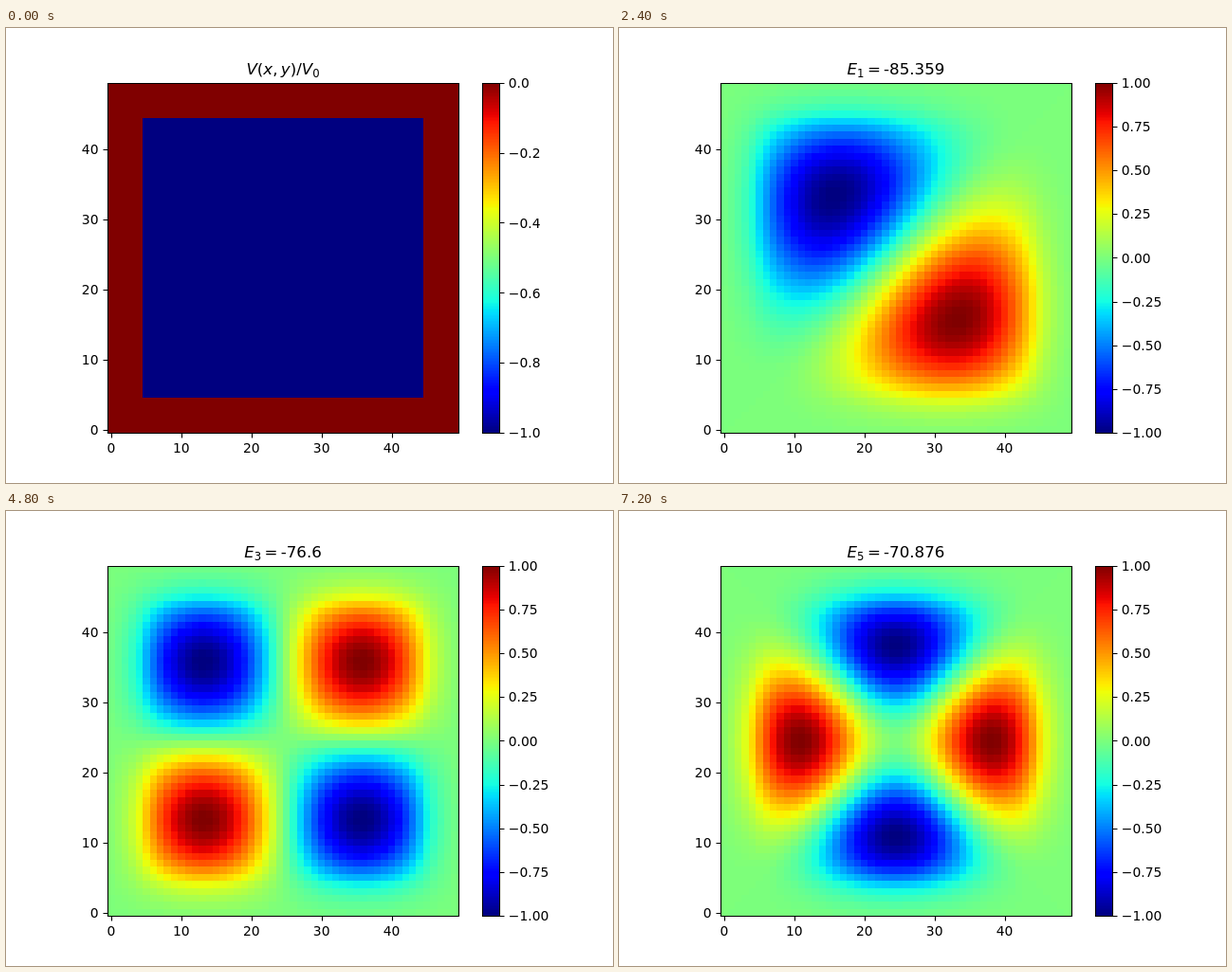
These frames come from a looping animation (640x480 px, 8 s). An HTML page with a canvas:

```html
<!DOCTYPE html>
<html lang="en">
<head>
<meta charset="utf-8">
<title>Square well states</title>
<style>
  html, body { margin: 0; width: 100%; height: 100%; overflow: hidden; background: #fff; }
  canvas, svg { position: absolute; left: 0; top: 0; width: 640px; height: 480px; display: block; }
  text { font-family: "DejaVu Sans", sans-serif; font-size: 13.89px; font-kerning: none; fill: #000; white-space: pre; }
  .title { font-size: 16.67px; }
  .it { font-style: italic; }
  .sub { font-size: 11.67px; }
  path { fill: none; stroke: #000; stroke-width: 1.11; }
</style>
</head>
<body>
<canvas id="heat" width="640" height="480"></canvas>
<svg id="plot" width="640" height="480" viewBox="0 0 640 480">
  <path d="M107.5 58.5H477.5V427.5H107.5ZM502.5 58.5H520.5V427.5H502.5Z"/>
  <g id="axes"></g>
  <g id="bar"></g>
  <text id="title" class="title" y="49"></text>
</svg>
<script>
const N = 50, W = N + 2;              // grid with a zero rim
const LEFT = 107.2, TOP = 57.6, BOTTOM = 427.2, SIZE = 369.6, CELL = SIZE / N;
const DEPTH = 100, KIN = 49 * 49 / 4; // well depth and kinetic factor
const HOLD = 1200, LOOP = 8000;

const $ = id => document.getElementById(id);
const ctx = $("heat").getContext("2d");
const at = (i, j) => (j + 1) * W + i + 1;
const inWell = i => i >= 5 && i < 45;

function grid(fn) {
  const g = new Float64Array(W * W);
  for (let j = 0; j < N; j++)
    for (let i = 0; i < N; i++) g[at(i, j)] = fn(i, j);
  return g;
}

const well = grid((i, j) => inWell(i) && inWell(j) ? -1 : 0);

// Standing wave n of a slightly wider box, used as a first guess
function wave(n, i) {
  const u = (i - 24.5) * Math.PI / 45;
  if (Math.abs(u) > Math.PI / 2) return 0;
  return n % 2 ? Math.cos(n * u) : Math.sin(n * u);
}

function removePart(g, ref) {
  let dot = 0, norm = 0;
  for (let k = 0; k < g.length; k++) { dot += g[k] * ref[k]; norm += ref[k] * ref[k]; }
  for (let k = 0; k < g.length; k++) g[k] -= dot / norm * ref[k];
}

// Relax a guess to the eigenstate of the well with the given energy
function solve(energy, guess, lower) {
  const step = 1 / 2600;
  let a = grid((i, j) => guess(i, j)), b = new Float64Array(W * W);
  for (let n = 0; n < 800; n++) {
    for (let j = 0; j < N; j++)
      for (let i = 0; i < N; i++) {
        const k = at(i, j);
        const lap = a[k - 1] + a[k + 1] + a[k - W] + a[k + W] - 4 * a[k];
        b[k] = a[k] + step * (KIN * lap + (energy - DEPTH * well[k]) * a[k]);
      }
    if (lower) removePart(b, lower);
    [a, b] = [b, a];
  }
  let top = 0;
  for (const v of a) top = Math.max(top, Math.abs(v));
  return a.map(v => v / top);
}

const pair = (m, n, sx, sy) => (i, j) =>
  sx * wave(m, i) * wave(n, j) + sy * wave(n, i) * wave(m, j);

const ground = solve(-94.127, pair(1, 1, 1, 0));
const scenes = [
  { data: well, tick: 0.2 },
  { data: ground, energy: "-94.127", tick: 0.2 },
  { data: solve(-85.359, pair(2, 1, 1, -1)), energy: "-85.359", tick: 0.25 },
  { data: solve(-85.359, pair(2, 1, -1, -1)), energy: "-85.359", tick: 0.25 },
  { data: solve(-76.6, pair(2, 2, 1, 0)), energy: "-76.6", tick: 0.25 },
  { data: solve(-70.895, pair(1, 3, 1, 1), ground), energy: "-70.895", tick: 0.2 },
  { data: solve(-70.876, pair(1, 3, 1, -1)), energy: "-70.876", tick: 0.25 }
];

function ramp(x, stops) {
  for (let s = 1; s < stops.length; s++) {
    const [x0, y0] = stops[s - 1], [x1, y1] = stops[s];
    if (x <= x1) return Math.round(255 * (y0 + (y1 - y0) * (x - x0) / (x1 - x0)));
  }
  return 0;
}

const RED = [[0, 0], [.35, 0], [.66, 1], [.89, 1], [1, .5]];
const GREEN = [[0, 0], [.125, 0], [.375, 1], [.64, 1], [.91, 0], [1, 0]];
const BLUE = [[0, .5], [.11, 1], [.34, 1], [.65, 0], [1, 0]];
const jet = Array.from({ length: 256 }, (_, i) =>
  `rgb(${[RED, GREEN, BLUE].map(c => ramp(i / 255, c)).join()})`);
const colour = t => jet[Math.max(0, Math.min(255, Math.floor(t * 256)))];

const label = (x, y, s, anchor) => `<text x="${x}" y="${y}" text-anchor="${anchor}">${s}</text>`;
const snap = v => Math.round(v) + 0.5;

function drawAxes() {
  let d = "", out = "";
  for (let v = 0; v < N; v += 10) {
    const off = (v + 0.5) * CELL, x = LEFT + off, y = BOTTOM - off;
    d += `M${snap(x)} 427.5v5M107.5 ${snap(y)}h-5`;
    out += label(x, 448, v, "middle") + label(97.5, Math.round(y + 5.2), v, "end");
  }
  $("axes").innerHTML = `<path d="${d}"/>` + out;
}

function drawBar(lo, hi, tick) {
  let d = "", out = "";
  const digits = tick === 0.2 ? 1 : 2;
  for (let n = Math.ceil(lo / tick - 1e-6); n * tick <= hi + 1e-6; n++) {
    const v = n * tick, y = BOTTOM - SIZE * (v - lo) / (hi - lo);
    d += `M520.5 ${snap(y)}h5`;
    out += label(529.8, Math.round(y + 5.2), (n < 0 ? "\u2212" : "") + Math.abs(v).toFixed(digits), "start");
  }
  $("bar").innerHTML = `<path d="${d}"/>` + out;
}

function drawTitle(energy, n) {
  const run = (x, s, cls = "", dy = 0) => `<tspan x="${x}" y="${49 + dy}" class="${cls}">${s}</tspan>`;
  if (!energy) {
    $("title").innerHTML = run(253.4, "V", "it") + run(264.8, "(") + run(271.3, "x", "it") +
      run(281.2, ",") + run(289.8, "y", "it") + run(299.7, ")") + run(306.2, "/") +
      run(311.8, "V", "it") + run(323.2, "0", "sub", 2.7);
    return;
  }
  const width = 16.67 * (0.361 + 0.318 + 0.636 * (energy.length - 2));
  const x = 292 - (38.5 + width) / 2;
  $("title").innerHTML = run(x, "E", "it") + run(x + 10.5, n, "sub", 2.7) +
    run(x + 21.3, "=") + run(x + 38.5, energy);
}

function draw(n) {
  const { data, energy, tick } = scenes[n];
  let lo = Infinity, hi = -Infinity;
  for (let j = 0; j < N; j++)
    for (let i = 0; i < N; i++) {
      const v = data[at(i, j)];
      lo = Math.min(lo, v);
      hi = Math.max(hi, v);
    }
  ctx.clearRect(0, 0, 640, 480);
  for (let j = 0; j < N; j++) {
    const y0 = Math.round(BOTTOM - (j + 1) * CELL), y1 = Math.round(BOTTOM - j * CELL);
    for (let i = 0; i < N; i++) {
      const x0 = Math.round(LEFT + i * CELL), x1 = Math.round(LEFT + (i + 1) * CELL);
      ctx.fillStyle = colour((data[at(i, j)] - lo) / (hi - lo));
      ctx.fillRect(x0, y0, x1 - x0, y1 - y0);
    }
  }
  for (let y = 58; y < 428; y++) {
    ctx.fillStyle = colour((BOTTOM - y - 0.5) / SIZE);
    ctx.fillRect(502, y, 18, 1);
  }
  drawBar(lo, hi, tick);
  drawTitle(energy, n - 1);
}

drawAxes();
let shown = -1;
const start = performance.now();
function frame() {
  const t = (performance.now() - start) % LOOP;
  const n = Math.min(scenes.length - 1, Math.floor(t / HOLD));
  if (n !== shown) draw(shown = n);
  requestAnimationFrame(frame);
}
frame();
</script>
</body>
</html>
```
